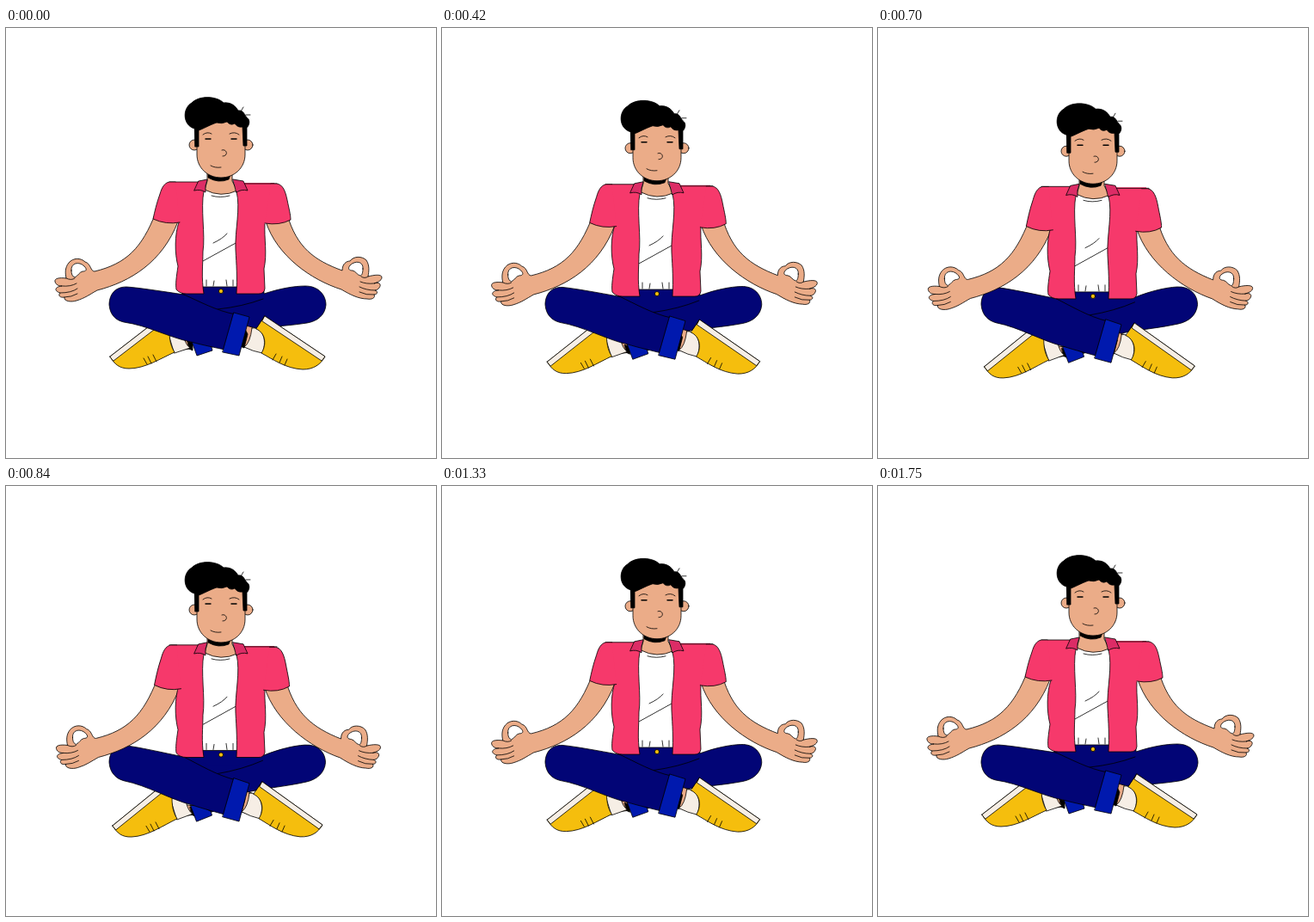
Recreate the animation shown at these times as an HTML page. Size 500 by 500 pixels, loop 1820 ms.

```html
<!DOCTYPE html>
<html lang="en">
<head>
<meta charset="utf-8">
<title>Meditation</title>
<style>
  html, body { margin: 0; width: 100%; height: 100%; overflow: hidden; background: #fff; }
  svg { display: block; width: 100%; height: 100%; }
  path, circle { stroke: #000; stroke-width: .8; stroke-linejoin: round; stroke-linecap: round; }
  .line { fill: none; }
  .flat { stroke: none; }
  .skin { fill: #ebac88; }
  .pink { fill: #f6396b; }
  .collar { fill: #dc2c66; }
  .navy { fill: #020576; }
  .cuff { fill: #0019ae; }
  .yellow { fill: #f5be0d; }
  .cream { fill: #f6eee5; }
  .white { fill: #fff; }
</style>
</head>
<body>
<svg viewBox="0 0 500 500">
  <g id="leftShoe">
    <path class="skin" d="M200 360L216 363 216 373 205 374Z"/>
    <path d="M211 364L217 366 217 375 213 373Z"/>
    <path class="cream" d="M188 352L206 357Q209 369 214 372L196 378Z"/>
    <path class="yellow" d="M121 382L174 341 190 352C190 366 193 372 196 377C180 384 162 396 143 396C132 396 126 391 121 382Z"/>
    <path class="cream" d="M121 382L174 341 181 344 125 387Z"/>
    <path class="line" d="M160 384L164 391M165 382L169 390M171 380L175 388"/>
  </g>
  <g id="rightLeg">
    <path class="cuff" d="M215 362L222 381 240 375 237 364Z"/>
    <path class="navy" d="M205 303H300V309C318 303 335 300 348 300C364 300 372 311 372 322C371 334 362 341 350 343C325 347 305 347 285 350L240 371 218 358 205 312Z"/>
    <path class="line" d="M246 327Q275 324 299 315"/>
  </g>
  <g id="rightShoe">
    <path class="skin" d="M279 346L290 349 286 374 275 370Z"/>
    <path d="M277 348L281 356 277 372 272 370Z"/>
    <path class="cream" d="M286 349C296 347 305 360 298 378Q287 376 277 371Q284 366 286 349Z"/>
    <path class="yellow" d="M301 335L371 382C366 391 358 397 345 397C325 396 310 385 297 378C304 367 301 354 291 350Z"/>
    <path class="cream" d="M301 335L371 382 367 387 298 341Z"/>
    <path class="line" d="M314 379L310 386M321 382L318 389M327 385L324 392"/>
  </g>
  <g id="leftLeg">
    <path class="navy" d="M207 310C180 306 155 302 140 301C125 301 120 312 120 322C121 334 128 340 137 342C165 346 190 360 215 365C230 369 245 372 254 374L267 333C245 329 225 318 207 310Z"/>
    <path class="cuff" d="M265 331L283 336 271 381 252 377Z"/>
  </g>
  <g id="leftArm">
    <path class="skin" d="M174 215C158 256 140 274 103 283C98 283 99 274 92 272C87 267 78 267 73 273C68 279 69 286 70 291C62 290 56 291 57 295C58 299 62 300 65 300C56 301 56 306 63 308C60 311 63 314 68 313C67 318 76 319 82 317C92 314 97 310 106 305C145 295 182 272 200 225V205Z"/>
    <path class="white" d="M76 282C75 273 85 271 91 277C95 281 93 283 89 283C85 284 84 288 80 290C77 289 76 286 76 282Z"/>
    <path class="line" d="M70 291Q76 294 80 291M65 300Q75 301 82 297M63 308Q76 308 83 303M68 313Q76 313 83 309"/>
  </g>
  <g id="rightArm">
    <path class="skin" d="M327 217C338 255 358 270 391 282C391 274 396 271 400 271C404 265 414 265 419 270C423 276 422 283 421 289C428 287 437 286 437 290C437 294 431 296 428 297C434 295 437 298 434 302C433 304 430 305 429 305C433 306 432 310 428 310C430 314 425 316 420 315C410 315 400 310 390 304C355 293 315 265 302 225V205Z"/>
    <path class="white" d="M415 280C416 271 406 270 400 276C397 280 399 282 403 282C407 283 408 287 412 288C414 288 415 284 415 280Z"/>
    <path class="line" d="M421 289Q417 292 413 289M428 297Q419 298 412 295M429 305Q419 305 411 301M428 310Q419 311 411 307"/>
  </g>
  <g id="torso">
    <path class="navy flat" d="M210 296H298V308L270 318H236L210 308Z"/>
    <path class="white" d="M226 187H272L270 301H228Z"/>
    <path class="skin" d="M234 160H263V178L269 189Q250 198 231 188L234 178Z"/>
    <path class="line" d="M239 195Q249 198 260 195M241 250Q252 245 257 239M229 271L269 249M233 293V300M242 294L241 300M256 293L257 300M264 293V300"/>
    <circle class="yellow" cx="250" cy="306" r="2.6"/>
    <path class="pink flat" d="M231 179H192V226H201C196 240 196 262 200 277C198 290 197 298 198 304Q202 309 210 309H230C227 290 229 275 229 260C232 240 226 210 230 190Z"/>
    <path class="pink flat" d="M268 180H312V226H301C300 245 304 262 300 280L301 303Q300 309 294 309H268C269 290 268 275 267 258C266 235 273 210 268 190Z"/>
    <path class="line" d="M225 179H190M201 226C196 240 196 262 200 277C198 290 197 298 198 304Q202 309 210 309H230C227 290 229 275 229 260C232 240 226 210 230 190"/>
    <path class="line" d="M276 181H315M301 228C300 245 304 262 300 280L301 303Q300 309 294 309H268C269 290 268 275 267 258C266 235 273 210 268 190"/>
    <path class="collar" d="M224 178L234 176Q231 184 232 191Q226 187 219 189Z"/>
    <path class="collar" d="M264 176L276 178 281 189Q274 187 268 191Z"/>
  </g>
  <g id="leftSleeve">
    <path class="pink flat" d="M197 179H190C184 180 181 186 179 193C175 204 173 213 171 222Q186 229 202 226Z"/>
    <path class="line" d="M197 179H190C184 180 181 186 179 193C175 204 173 213 171 222Q186 229 202 226"/>
  </g>
  <g id="rightSleeve">
    <path class="pink flat" d="M308 181H315C322 182 325 190 327 200C329 210 331 217 331 223Q318 230 301 227Z"/>
    <path class="line" d="M308 181H315C322 182 325 190 327 200C329 210 331 217 331 223Q318 230 301 227"/>
  </g>
  <g id="head">
    <path d="M235 165V174Q247 181 259 176L262 168Z"/>
    <circle class="skin" cx="219" cy="136" r="6"/>
    <circle class="skin" cx="281" cy="136" r="6"/>
    <path class="skin" d="M222 105V147C222 163 235 174 250 174C265 174 278 163 278 147V105Z"/>
    <path d="M219 117C205 113 205 93 216 87C225 78 245 79 253 87C262 86 267 91 270 96C277 95 277 102 282 106C284 110 282 114 280 116V137H276L275 115Q269 116 266 111Q261 114 257 109Q251 112 245 110C236 113 230 117 224 119V138H220Z"/>
    <path class="line" d="M229 124Q234 120 239 123M260 123Q266 120 271 124M251 142C257 140 259 149 252 149M238 160Q243 163 250 162M273 97L276 92M279 101H284"/>
    <path class="line" style="stroke-width:1.4" d="M232 129H238M262 129H268"/>
  </g>
</svg>
<script>
const FRAME_MS = 70, FRAMES = 26;

// Full-breath displacement: x, y, extra y per unit of x, extra y per unit of y.
const sway = {
  head: [0, 8, 0, 0],
  torso: [0, 5, 0, 0.005],
  leftSleeve: [1.5, -8.3, 0, 0.08],
  rightSleeve: [-1.5, -9, 0, 0.085],
  leftArm: [1.5, 10.5, 0, 0],
  rightArm: [-1.5, -2, 0.036, 0],
  leftLeg: [0, -7.75, 0.062, 0],
  rightLeg: [-0.5, 23.4, -0.064, 0],
  leftShoe: [3, 17.8, -0.04, 0],
  rightShoe: [-3, -4.6, 0.045, 0]
};

function draw(now) {
  const frame = Math.floor(now / FRAME_MS) % FRAMES;
  const breath = (1 - Math.cos(2 * Math.PI * frame / (FRAMES - 1))) / 2;
  for (const [id, values] of Object.entries(sway)) {
    const [dx, dy, skew, stretch] = values.map(v => v * breath);
    document.getElementById(id).setAttribute("transform",
      `matrix(1 ${skew} 0 ${1 + stretch} ${dx} ${dy})`);
  }
}

const start = performance.now();
function loop() {
  draw(performance.now() - start);
  requestAnimationFrame(loop);
}
loop();
</script>
</body>
</html>
```
